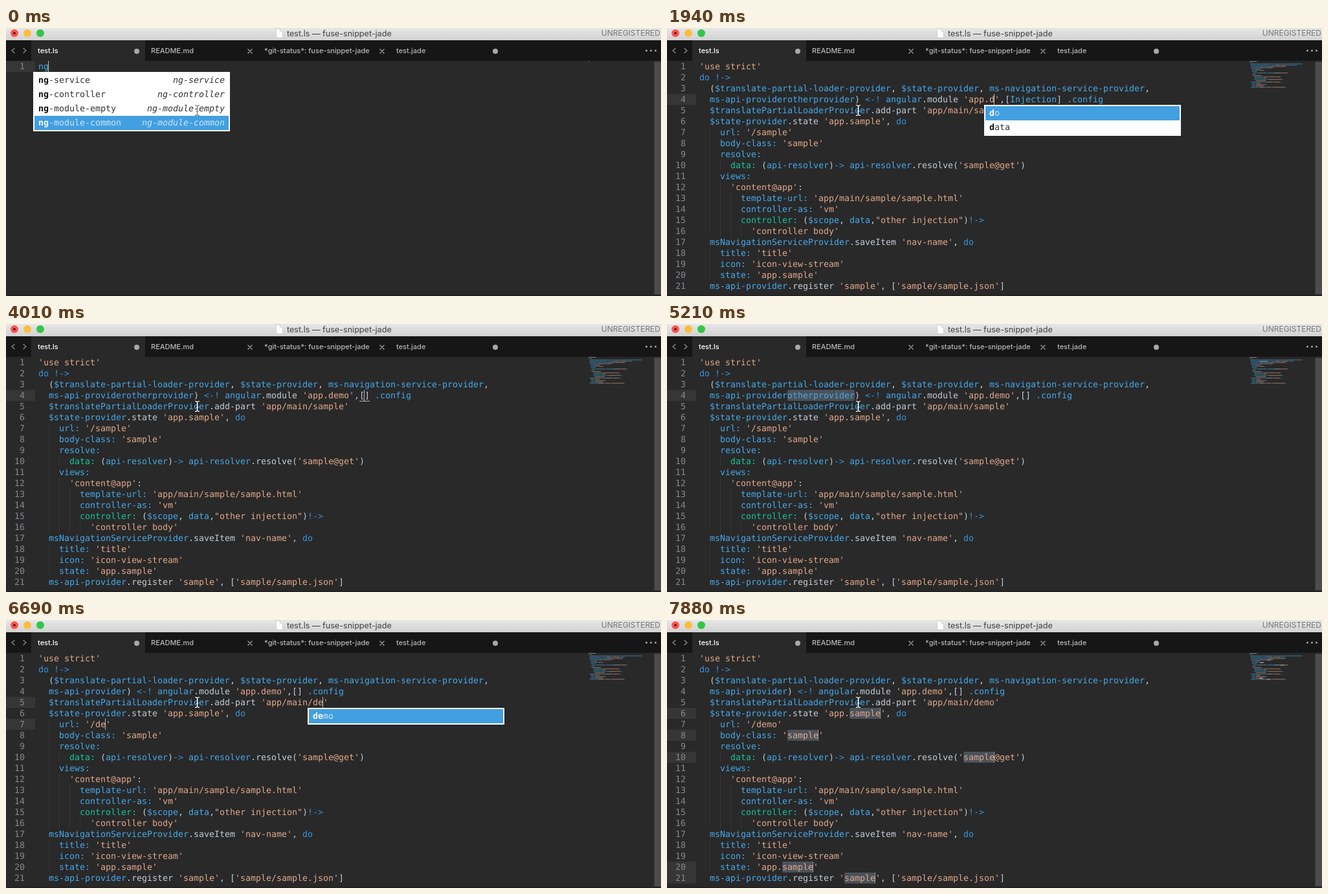
Write an HTML page that moves like this. It is 1012 by 415 pixels and loops after 8 s.

```html
<!DOCTYPE html>
<html lang="en">
<head>
<meta charset="utf-8">
<title>Snippet demo</title>
<style>
  html, body { margin: 0; width: 100%; height: 100%; overflow: hidden; background: #292929; }
  svg { display: block; width: 100%; height: 100%; }
  text { white-space: pre; }
  .ui { font-family: Inter, Roboto, sans-serif; }
  .tab { font-size: 11px; font-weight: 500; fill: #b9b9b9; }
  .mono { font: 13.290px "DejaVu Sans Mono", "Noto Sans Mono", monospace; text-rendering: geometricPrecision; }
</style>
</head>
<body>
<svg viewBox="0 0 1012 415" xmlns="http://www.w3.org/2000/svg">
  <defs>
    <linearGradient id="bar" x1="0" y1="0" x2="0" y2="1">
      <stop offset="0" stop-color="#e6e6e6"/>
      <stop offset="1" stop-color="#d2d2d2"/>
    </linearGradient>
  </defs>
  <rect width="1012" height="415" fill="#292929"/>
  <g class="ui">
    <rect width="1012" height="19" fill="url(#bar)"/>
    <circle cx="13" cy="8" r="6" fill="#fc5650"/>
    <circle cx="13" cy="8" r="2" fill="#6e0f0b"/>
    <circle cx="33" cy="8" r="6" fill="#fdbd3e"/>
    <circle cx="53" cy="8" r="6" fill="#33c748"/>
    <path d="M417.500 1.500h6l4 4v9.500h-10z" fill="#fff" stroke="#c4c4c4" stroke-width=".7"/>
    <path d="M423.500 1.500v4h4" fill="none" stroke="#c4c4c4" stroke-width=".7"/>
    <text x="434" y="13" font-size="12.600" fill="#404040">test.ls — fuse-snippet-jade</text>
    <text x="1011" y="12" font-size="12" fill="#777" text-anchor="end">UNREGISTERED</text>
    <rect y="19" width="1012" height="32" fill="#161616"/>
    <rect x="39" y="19" width="176" height="32" fill="#292929"/>
    <path d="M13.500 31l-4.500 4 4.500 4M26.500 31l4.500 4-4.500 4" fill="none" stroke="#8a8a8a" stroke-width="1.300"/>
    <g class="tab">
      <text x="49" y="39" style="fill:#fff">test.ls</text>
      <text x="224" y="39">README.md</text>
      <text x="399" y="39">*git-status*: fuse-snippet-jade</text>
      <text x="603" y="39">test.jade</text>
    </g>
    <path d="M373.500 32.500l7 7m0-7l-7 7M577.500 32.500l7 7m0-7l-7 7" stroke="#a5a5a5" stroke-width="1.200"/>
    <g fill="#a8a8a8">
      <circle cx="202" cy="36" r="4"/><circle cx="756" cy="36" r="4"/>
      <circle cx="989.500" cy="35" r="1.500"/><circle cx="996.500" cy="35" r="1.500"/><circle cx="1003.500" cy="35" r="1.500"/>
    </g>
  </g>
  <rect x="1001" y="51" width="11" height="364" fill="#363636"/>
  <rect x="1002" y="53" width="10" height="359" fill="#4c4c4c"/>
  <rect y="413" width="1012" height="2" fill="#222"/>
  <g id="editor" class="mono"></g>
  <path id="mouse" d="M292 119.500q3 0 3.500 2q.5-2 3.500-2M295.500 121v13M292 135.500q3 0 3.500-2q.5 2 3.500 2M293.500 129h4" fill="none" stroke-width="1.200"/>
</svg>
<script>
const LOOP = 8000, LEFT = 50, TOP = 51, CHAR = 8, ROW = 17;
const COLOR = { str: '#e2a88a', op: '#3793dc', key: '#14c49a', member: '#c3ccd5', id: '#45a9ea', punct: '#bccbd8' };

const TOKEN = new RegExp([
  /(?<str>'[^']*'|"[^"]*")/, /(?<op><-!|!?->|\bdo\b)/, /(?<key>\b(?:data|controller):)/,
  /(?<member>(?<=\w)\.[\w-]+(?=[ (]))/, /(?<id>\.?[$\w-]+:?)/, /(?<punct>[^\s\w])/
].map(r => r.source).join('|'), 'g');

// The completed snippet, with its editable fields filled in.
const snippet = v => `'use strict'
do !->
  ($translate-partial-loader-provider, $state-provider, ms-navigation-service-provider,
  ms-api-provider${v.extra}) <-! angular.module 'app.${v.name}',[${v.inject}] .config
  $translatePartialLoaderProvider.add-part 'app/main/${v.path}'
  $state-provider.state 'app.sample', do
    url: '/${v.path}'
    body-class: 'sample'
    resolve:
      data: (api-resolver)-> api-resolver.resolve('sample@get')
    views:
      'content@app':
        template-url: 'app/main/sample/sample.html'
        controller-as: 'vm'
        controller: ($scope, data,"other injection")!->
          'controller body'
  msNavigationServiceProvider.saveItem 'nav-name', do
    title: 'title'
    icon: 'icon-view-stream'
    state: 'app.sample'
  ms-api-provider.register 'sample', ['sample/sample.json']`;

// Row and column of every place a field occurs.
const SPOTS = {
  start: () => [[1, 0]],
  name: () => [[4, 56]],
  inject: v => [[4, 59 + v.name.length]],
  extra: () => [[4, 17]],
  path: () => [[5, 53], [7, 11]],
  state: () => [[6, 29], [8, 17], [10, 51], [20, 16], [21, 28]]
};
const DEFAULTS = { start: 'ng', name: 'module', inject: 'Injection', extra: 'otherprovider', path: 'sample', state: 'sample' };

const jump = field => ({ field, sel: true, caret: 1, marks: [] });
const type = (word, pop = null) => ({ word, pop, sel: false, caret: 1, boxed: null });
const dim = { caret: .5 }, off = { caret: 0 }, on = { caret: 1 };

const STEPS = [
  [0, { field: 'start', caret: 1, marks: [],
        pop: { items: ['ng-service', 'ng-controller', 'ng-module-empty', 'ng-module-common'], active: 3, hints: true } }],
  [140, off],
  [590, { ...jump('name'), pop: null, boxed: [4, 44, 6] }],
  [890, dim], [1040, off], [1640, on],
  [1940, type('d', { items: ['do', 'data'], active: 0 })],
  [2090, type('de')],
  [2530, dim], [2680, off],
  [2980, type('dem')], [3120, type('demo')],
  [3420, { ...jump('inject'), marks: [[4, 62], [4, 72]] }],
  [3870, dim],
  [4010, { ...type(''), marks: [[4, 62], [4, 63]] }],
  [4460, dim],
  [4610, jump('extra')],
  [5060, dim], [5210, off],
  [5650, { ...type(''), marks: [[3, 2], [4, 17]] }],
  [5950, jump('path')],
  [6250, dim], [6400, off],
  [6540, type('d')],
  [6690, type('de', { items: ['demo'], active: 0 })],
  [6840, type('dem', { items: ['demo'], active: 0 })],
  [6980, type('demo')],
  [7430, dim],
  [7580, jump('state')],
  [7880, { caret: .7 }]
];

const esc = s => s.replace(/&/g, '&amp;').replace(/</g, '&lt;').replace(/>/g, '&gt;');
const colX = col => LEFT + col * CHAR;
const rowY = row => TOP + (row - 1) * ROW;
const rect = (x, y, w, h, fill, more = '') => `<rect x="${x}" y="${y}" width="${w}" height="${h}" fill="${fill}" ${more}/>`;
const text = (x, y, s, fill, more = '') => `<text x="${x}" y="${y}" fill="${fill}" ${more}>${esc(s)}</text>`;

function stateAt(index) {
  const s = { vals: { ...DEFAULTS } };
  for (const [, change] of STEPS.slice(0, index + 1)) {
    Object.assign(s, change);
    if ('word' in change) s.vals[s.field] = change.word;
  }
  return s;
}

function drawLine(line, row) {
  let out = '';
  const indent = line.search(/\S/);
  for (let col = 2; col < indent; col += 2) out += rect(colX(col), rowY(row), 1, ROW, '#353535');
  for (const m of line.matchAll(TOKEN)) {
    const kind = Object.keys(m.groups).find(k => m.groups[k] !== undefined);
    const fill = COLOR[kind];
    out += text(colX(m.index), rowY(row) + 13, m[0], fill);
    out += rect(900 + m.index * .94, TOP + (row - 1) * 2, m[0].length * .94, 1.2, fill, 'opacity=".5"');
  }
  return out;
}

function drawPopup({ items, active, hints }, [row, col], typed) {
  const x = colX(col) - 8, y = rowY(row) + ROW, n = typed.length;
  let out = rect(x, y, 304, items.length * 22 + 4, '#fff');
  items.forEach((item, i) => {
    const top = y + 2 + i * 22, lit = i === active;
    const fill = lit ? '#cfe6f8' : '#333';
    if (lit) out += rect(x + 2, top, 300, 22, '#429fe0');
    out += text(x + 8, top + 15, item.slice(0, n), lit ? '#fff' : '#111', 'font-weight="700"');
    out += text(x + 8 + n * CHAR, top + 15, item.slice(n), fill);
    if (hints) out += text(x + 296, top + 15, item, fill, 'font-style="italic" text-anchor="end"');
  });
  return out;
}

function draw(s) {
  const lines = s.field === 'start' ? [s.vals.start] : snippet(s.vals).split('\n');
  const spots = SPOTS[s.field](s.vals);
  const word = s.vals[s.field], len = word.length;
  let out = '';
  for (const [row, col] of spots) {
    out += rect(0, rowY(row), 45, ROW, '#363636');
    if (s.sel) {
      out += rect(colX(col), rowY(row), len * CHAR, ROW, '#4a525b', 'rx="2"');
      out += rect(900 + col * .94, TOP + (row - 1) * 2, len * .94, 2, '#5b6670');
    }
  }
  lines.forEach((line, i) => {
    out += text(29, rowY(i + 1) + 13, String(i + 1), '#85888b', 'text-anchor="end"');
    out += drawLine(line, i + 1);
  });
  if (s.boxed) {
    const [row, col, n] = s.boxed;
    out += rect(colX(col) - .5, rowY(row) + .5, n * CHAR + 1, ROW - 1, 'none', 'rx="2" stroke="#a3a3a3"');
  }
  for (const [row, col] of s.marks) out += rect(colX(col), rowY(row) + ROW, CHAR, 1, '#b5b5b5');
  for (const [row, col] of spots) {
    out += rect(colX(col + len) - 1, rowY(row), 1, ROW, '#b4bbc2', `opacity="${s.caret}"`);
  }
  if (s.pop) out += drawPopup(s.pop, spots[0], word);
  document.getElementById('editor').innerHTML = out;
  document.getElementById('mouse').setAttribute('stroke', s.field === 'start' ? '#777' : '#fff');
}

let shown = -1;
const began = performance.now();
function tick() {
  const t = (performance.now() - began) % LOOP;
  const index = STEPS.filter(([at]) => at <= t).length - 1;
  if (index !== shown) draw(stateAt(shown = index));
  requestAnimationFrame(tick);
}
tick();
</script>
</body>
</html>
```
